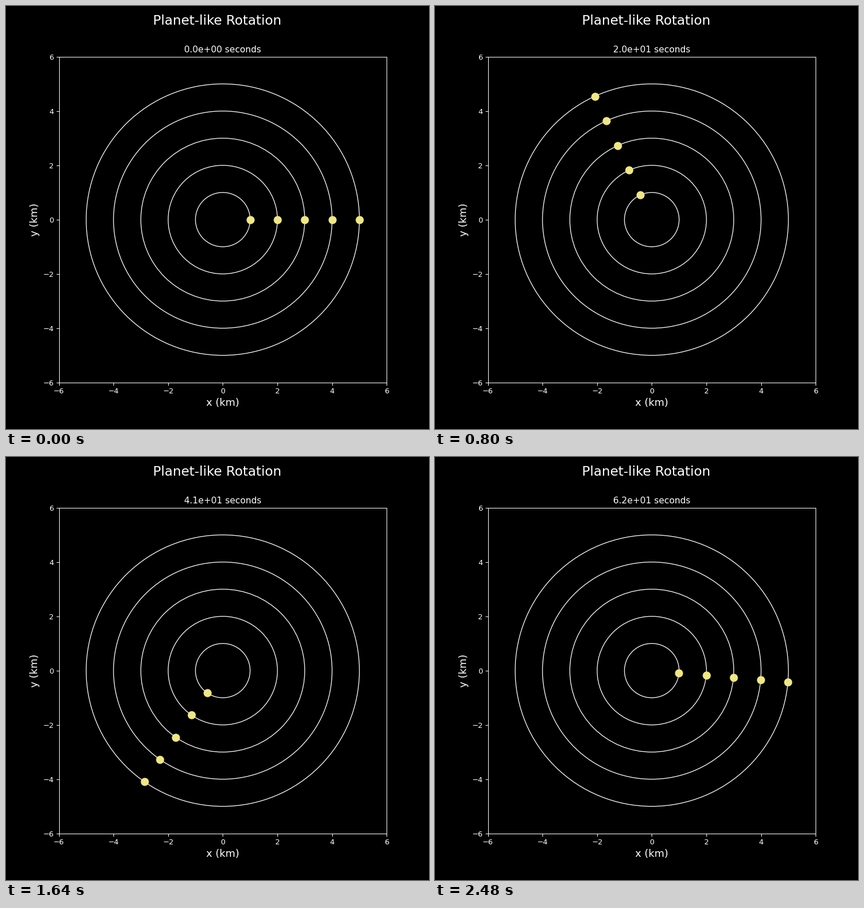
Write a matplotlib script that moves like this. It is 748 px wide and 748 px high and loops after 2.52 s.

```python
import numpy as np
import matplotlib.pyplot as plt
from matplotlib.animation import FuncAnimation
from matplotlib.patches import Circle

FRAMES = 63
INTERVAL = 40   # ms
OMEGA = 0.1     # rad per second, the same for every orbit
LIMIT = 6
RADII = np.arange(1, 6)

plt.style.use("dark_background")
plt.rcParams["font.family"] = "DejaVu Sans"

fig, ax = plt.subplots(figsize=(8, 8), dpi=93.5)
fig.suptitle("Planet-like Rotation", fontsize=18)
ax.set_xlim(-LIMIT, LIMIT)
ax.set_ylim(-LIMIT, LIMIT)
ax.set_xlabel("x (km)", fontsize=14)
ax.set_ylabel("y (km)", fontsize=14)
title = ax.set_title("")

for radius in RADII:
    ax.add_patch(Circle((0, 0), radius, fill=False, edgecolor="white", lw=1))

planets, = ax.plot([], [], "o", color="khaki", markersize=10)


def update(second):
    angle = OMEGA * second
    planets.set_data(RADII * np.cos(angle), RADII * np.sin(angle))
    title.set_text(f"{second:.1e} seconds")
    return planets, title


anim = FuncAnimation(fig, update, frames=FRAMES, interval=INTERVAL,
                     repeat=True, repeat_delay=0)
plt.show()
```
